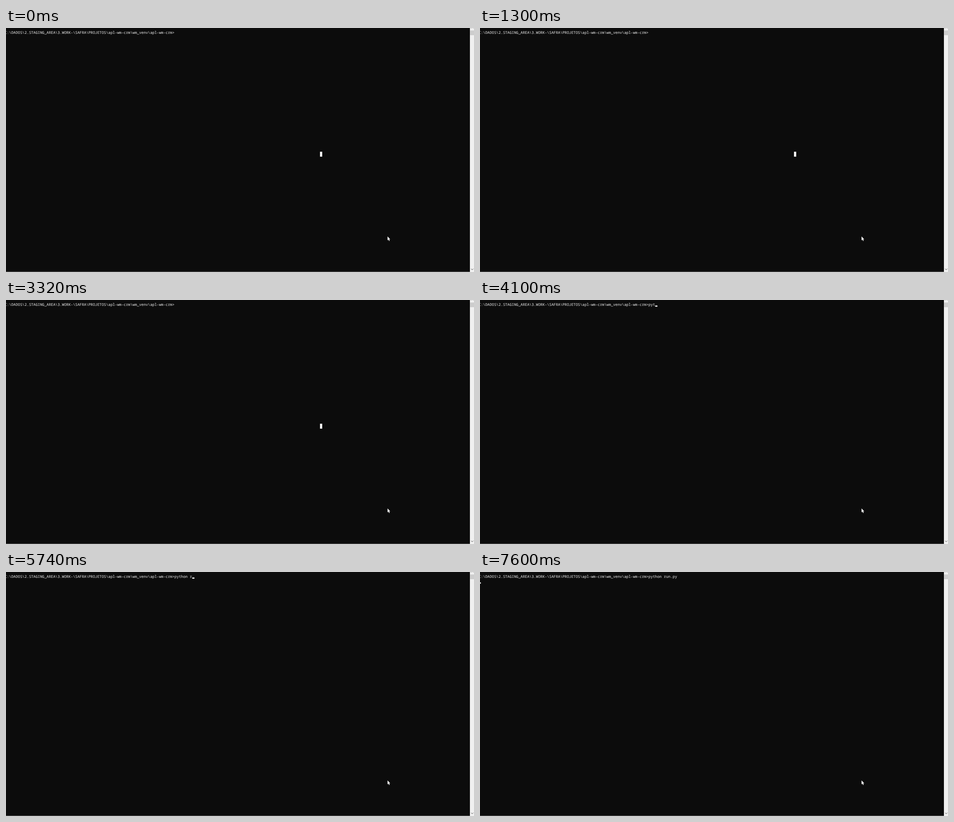
Animation, 1033 px wide and 542 px high, one loop 8 s. Source, as an HTML page:

```html
<!DOCTYPE html>
<html lang="pt">
<head>
<meta charset="utf-8">
<title>Terminal</title>
<style>
  html, body { margin: 0; width: 100%; height: 100%; overflow: hidden; background: #0c0c0c; }
  svg { display: block; }
  text {
    font: 8.117px "Noto Sans Mono", "DejaVu Sans Mono", monospace;
    fill: #ccc;
    stroke: #ccc;
    stroke-width: .15px;
    white-space: pre;
    text-rendering: geometricPrecision;
  }
</style>
</head>
<body>
<svg width="1033" height="542" viewBox="0 0 1033 542">
  <rect width="1033" height="542" fill="#0c0c0c"/>
  <rect y="541" width="1024" height="1" fill="#555"/>
  <text id="line" x="-2.9" y="13"></text>
  <rect id="caret" width="4.87" height="2.7" fill="#f2f2f2"/>
  <rect id="block" x="693" y="274.8" width="5" height="11" fill="#f2f2f2"/>

  <rect x="1024" width="9" height="542" fill="#f0f0f0"/>
  <rect x="1024.3" y="5.5" width="8.7" height="10.5" fill="#cdcdcd"/>
  <path d="M1026.5 .7l2.5-2.5 2.5 2.5M1026.5 534.7l2.5 2.5 2.5-2.5" fill="none" stroke="#505050"/>

  <path d="M842.2 463v8.8l2-1.8 1.4 3.2 1.4-.6-1.4-3.1h2.6z" fill="#fff"/>
  <circle id="click" cx="841.6" cy="462.7" r="8.1" fill="#ff0" opacity=".5"/>
</svg>
<script>
const LOOP = 8000, LEFT = -2.9, CELL = 4.87;
const PROMPT = 'C:\\DADOS\\2.STAGING_AREA\\3.WORK-\\SAFRA\\PROJETOS\\apl-wm-crm\\wm_venv\\apl-wm-crm>';

// The screen refreshes once per beat; the caret blinks on its own clock.
const BEAT = 77.87, LEAD = 36;
const blinks = beat => Math.floor((beat - 22.46) / 6.742);

// Beat of each event and what it types; an empty one only wakes the caret.
const keys = Object.entries({
  23: '', 48: 'p', 50: 'y', 53: 't', 54: 'h', 55: 'o', 58: 'n', 61: ' ',
  74: 'r', 76: 'u', 77: 'n', 88: '.py', 90: '', 98: '\n'
});

const [line, caret, block, click] =
  ['line', 'caret', 'block', 'click'].map(id => document.getElementById(id));
const show = (el, on) => el.setAttribute('visibility', on ? 'visible' : 'hidden');

function draw(t) {
  const beat = Math.floor((t + LEAD) / BEAT);
  const pressed = keys.filter(([at]) => at <= beat);
  const typed = PROMPT + pressed.map(([, text]) => text).join('');
  const rows = typed.split('\n');
  line.textContent = rows[0];
  caret.setAttribute('x', LEFT + rows.at(-1).length * CELL);
  caret.setAttribute('y', 12.2 + (rows.length - 1) * 10.9);
  // Each key shows the caret again, and blinks toggle it from there.
  show(caret, pressed.length && (blinks(beat) - blinks(pressed.at(-1)[0])) % 2 === 0);
  show(block, typed === PROMPT);
  show(click, beat === 16);
}

const began = performance.now();
function tick() {
  draw((performance.now() - began) % LOOP);
  requestAnimationFrame(tick);
}
tick();
</script>
</body>
</html>
```
